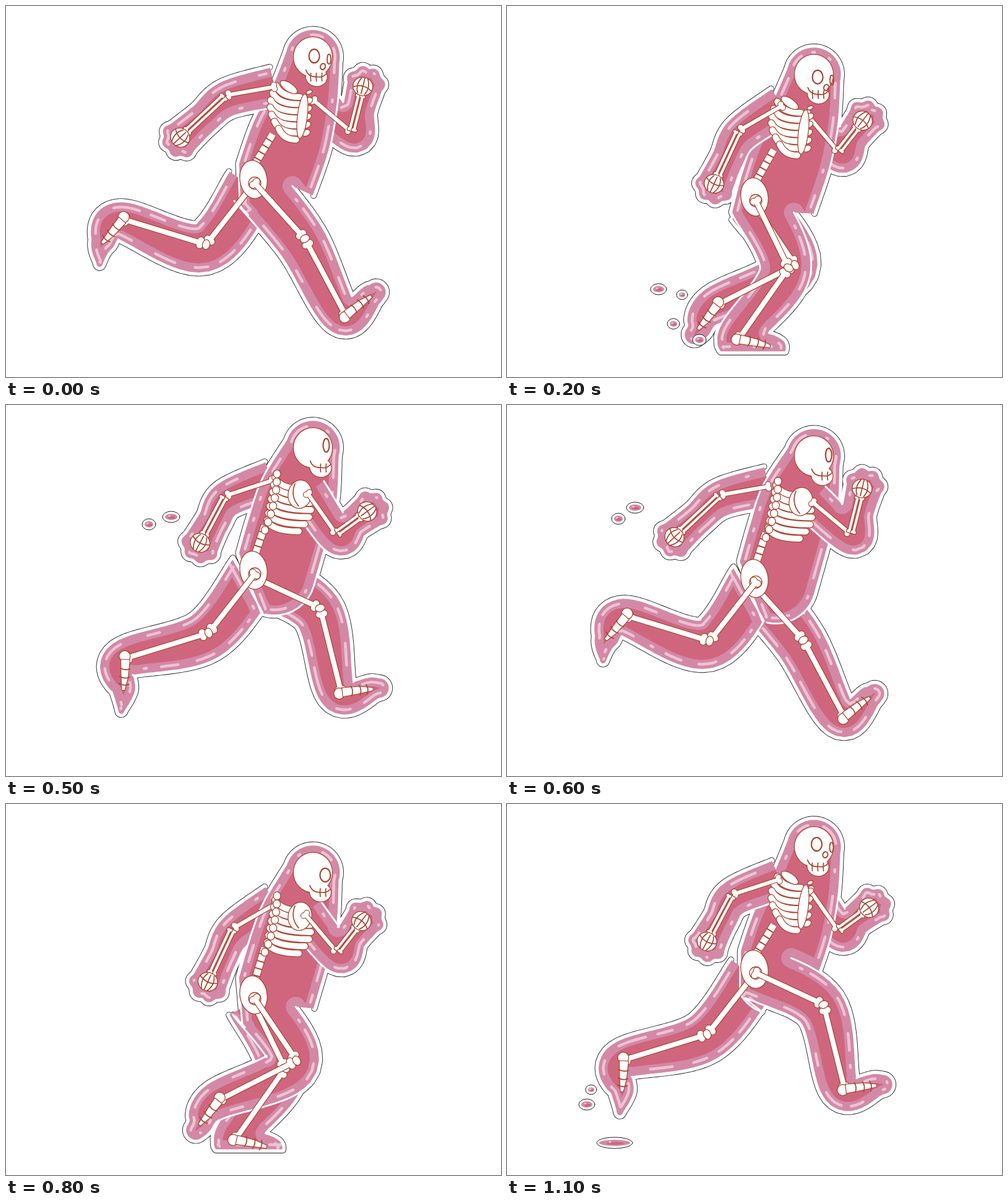
Write an HTML page with a canvas that moves like this. It is 800 px wide and 600 px high and loops after 1200 ms.

```html
<!DOCTYPE html>
<html lang="en">
<head>
<meta charset="utf-8">
<title>Running skeleton</title>
<style>
html, body { margin: 0; width: 100%; height: 100%; overflow: hidden; background: #fff; }
canvas { display: block; }
</style>
</head>
<body>
<canvas id="stage" width="800" height="600"></canvas>
<script>
const ctx = document.getElementById('stage').getContext('2d');
const WHITE = '#fff', INK = '#222', DEEP = '#cf667e', RIM = '#d389a5', SHINE = '#ecc3d4', EDGE = '#a9452f';
const STEP = 100, PHASES = 12, HALF = 6, FLOOR = 560;
const DEG = Math.PI / 180;

// Both sides share one cycle, half a turn apart.
// Leg: angles of thigh, shin and foot. Arm: angles of upper arm and forearm, forearm length.
const LEG = {
  0: [48, 62, -37], 2: [64, 125, 13], 4: [118, 132, 73], 5: [128, 163, 94],
  6: [128, 197, 131], 8: [56, 153, 128], 10: [17, 88, 35], 11: [25, 76, -6]
};
const ARM = {
  0: [170, 137, 100], 2: [150, 115, 95], 4: [87, 20, 97], 5: [55, -36, 62],
  6: [40, -76, 76], 8: [50, -52, 64], 10: [134, 57, 78], 11: [162, 118, 86]
};
// Flying drops: first and last phase, position, speed per phase, radius.
const DROPS = [
  [2, 4, 245, 458, -42, -15, 9], [2, 4, 283, 467, -52, -26, 5],
  [2, 4, 269, 514, -73, 11, 6], [2, 4, 311, 540, -82, -16, 7],
  [4, 6, 327, 196, -60, -15, 10], [4, 6, 282, 202, -51, -9, 7],
  [10, 11, 182, 464, -53, 22, 9], [10, 11, 204, 445, -68, 17, 5],
  [4, 4, 499, 499, 0, 0, 7], [11, 11, 174, 548, 0, 0, 25]
];

const lerp = (a, b, k) => a.map((v, i) => v + (b[i] - v) * k);
const dist = (a, b) => Math.hypot(a[0] - b[0], a[1] - b[1]);
const polar = (p, angle, r) => [p[0] + Math.cos(angle) * r, p[1] + Math.sin(angle) * r];
const heading = (a, b) => Math.atan2(b[1] - a[1], b[0] - a[0]);
const wave = p => Math.cos(p * 2 * Math.PI / PHASES);

function cycle(keys, phase) {
  const p = phase % PHASES;
  let lo = p, hi = p + 1;
  while (!keys[lo]) lo--;
  while (!keys[hi % PHASES]) hi++;
  return lerp(keys[lo], keys[hi % PHASES], (p - lo) / (hi - lo));
}

function legJoints(hip, phase) {
  const [thigh, shin, foot] = cycle(LEG, phase);
  const knee = polar(hip, thigh * DEG, 121), ankle = polar(knee, shin * DEG, 140);
  return [hip, knee, ankle, polar(ankle, foot * DEG, 52)];
}

function armJoints(shoulder, phase) {
  const [upper, fore, length] = cycle(ARM, phase);
  const elbow = polar(shoulder, upper * DEG, 82);
  return [shoulder, elbow, polar(elbow, fore * DEG, length)];
}

function spline(pts, i, t) {
  const at = n => pts[Math.max(0, Math.min(pts.length - 1, n))];
  const [a, b, c, d] = [at(i - 1), at(i), at(i + 1), at(i + 2)];
  return b.map((v, n) => v + 0.5 * t * (c[n] - a[n] +
    t * (2 * a[n] - 5 * v + 4 * c[n] - d[n] + t * (3 * (v - c[n]) + d[n] - a[n]))));
}

// Smooth centre line of [x, y, radius] nodes.
function chain(nodes) {
  const line = [];
  for (let i = 0; i < nodes.length - 1; i++)
    for (let s = 0; s < 14; s++) line.push(spline(nodes, i, s / 14));
  line.push(nodes[nodes.length - 1]);
  return line;
}

function arc(center, from, to, lobes = 0) {
  return Array.from({ length: 31 }, (_, i) => {
    const k = i / 30, bump = lobes ? 0.16 * Math.abs(Math.sin(k * lobes * Math.PI)) : 0;
    return polar(center, from + (to - from) * k, center[2] * (1 + bump));
  });
}

// Points of an outline that lie outside every circle of a chain.
const clear = (pts, line) => pts.filter(p => line.every(q => dist(p, q) > q[2] - 2.5));

function skin(line, lobes) {
  const fore = [], aft = [], last = line.length - 1, quarter = Math.PI / 2;
  let angle;
  line.forEach((q, i) => {
    angle = heading(line[Math.max(0, i - 1)], line[Math.min(last, i + 1)]);
    fore.push(polar(q, angle - quarter, q[2]));
    aft.unshift(polar(q, angle + quarter, q[2]));
  });
  const cap = arc(line[last], angle - quarter, angle + quarter, lobes);
  return { fore: clear(fore, line), cap: clear(cap, line), aft: clear(aft, line) };
}

// Evenly spaced points along a polyline.
function even(line, gap) {
  const out = [line[0]];
  let left = gap;
  for (let i = 1; i < line.length; i++) {
    const d = dist(line[i - 1], line[i]);
    let at = left;
    for (; at <= d; at += gap) out.push(lerp(line[i - 1], line[i], at / d));
    left = at - d;
  }
  return out;
}

const limb = ({ fore, cap, aft }) => even([...fore, ...cap, ...aft], 4);

// The flesh sags a little behind the bones; a lifted foot drips.
function legChain([hip, knee, ankle, toe], phase) {
  const drip = Math.max(0, wave(phase - 5.5) * 3 - 2);
  const tip = polar(toe, heading(ankle, toe), 10 * (1 - drip));
  return chain([
    [...hip, 44], [knee[0] - 5, knee[1] + 5, 41], [ankle[0] - 6, ankle[1] + 2, 31],
    [...toe, 20], [tip[0] - 4 * drip, tip[1] + 36 * drip, 17 - 12 * drip]
  ]);
}

function armChain([s, e, h]) {
  const elbow = [e[0] + 4, e[1] + 5], wrist = lerp(elbow, h, 0.5);
  return chain([[...s, 33], [...elbow, 30], [...wrist, 27], [h[0] + 3, h[1], 30]]);
}

const onFloor = pts => pts.map(([x, y]) => [x, Math.min(y, FLOOR)]);

function bodyOutline(legLine, torso, ahead) {
  const leg = skin(legLine), trunk = skin(torso);
  const up = heading(torso[0], torso[1]), down = up + Math.PI;
  const belly = ahead ? [] : arc(torso[0], up + Math.PI / 2, down);
  const seat = arc(torso[0], down, down + Math.PI / 2);
  const front = ahead ? leg.fore.slice(6) : clear(leg.fore, torso);
  return even([
    ...front, ...leg.cap, ...clear(leg.aft, torso),
    ...clear([...seat, ...trunk.fore], legLine), ...trunk.cap,
    ...clear([...trunk.aft, ...belly], legLine)
  ], 4);
}

function makePose(phase) {
  const bob = 21 * Math.cos((phase - 1.85) * Math.PI / 3), turn = wave(phase - 0.3);
  const twist = (1 - turn) / 2, far = phase + HALF;
  const hip = [402, 294 + bob], skull = [496, 90 + bob];
  const legs = [legJoints(hip, phase), legJoints([hip[0] - 4, hip[1] + 4], far)];
  const arms = [
    armJoints([464 - 29 * turn, 150 + 0.9 * bob - 13 * turn], phase),
    armJoints([460 + 36 * turn, 148 + 0.9 * bob + 10 * turn], far)
  ];
  const torso = chain([
    [434, hip[1] + 1, 66], [460 - 5 * twist, skull[1] + 130, 66],
    [481 - 7 * twist, skull[1] + 68, 56 + 8 * twist], [...skull, 45]
  ]);
  return {
    phase, bob, twist, hip, skull, legs, arms, back: turn < -0.2,
    flesh: [
      limb(skin(armChain(arms[1]), 4)),
      onFloor(limb(skin(legChain(legs[1], far % PHASES)))),
      onFloor(bodyOutline(legChain(legs[0], phase), torso, legs[0][1][0] > hip[0] + 20)),
      limb(skin(armChain(arms[0]), 4))
    ]
  };
}

function trace(pts) {
  ctx.beginPath();
  for (const p of pts) ctx.lineTo(p[0], p[1]);
}

function stroke(color, width) {
  ctx.strokeStyle = color;
  ctx.lineWidth = width;
  ctx.stroke();
}

function fill(color) {
  ctx.fillStyle = color;
  ctx.fill();
}

function oval(x, y, rx, ry, rot = 0) {
  ctx.beginPath();
  ctx.ellipse(x, y, rx, ry, rot, 0, 7);
}

function whiteOval(...spec) {
  oval(...spec);
  fill(WHITE);
  stroke(EDGE, 1.3);
}

function bow(x1, y1, cx, cy, x2, y2) {
  ctx.beginPath();
  ctx.moveTo(x1, y1);
  ctx.quadraticCurveTo(cx, cy, x2, y2);
}

function curve(...spec) {
  bow(...spec);
  stroke(EDGE, 1.7);
}

function local([x, y], angle, paint) {
  ctx.save();
  ctx.translate(x, y);
  ctx.rotate(angle);
  paint();
  ctx.restore();
}

function seeded(seed) {
  return () => (seed = seed * 16807 % 2147483647) / 2147483647;
}

function drawFlesh(pts, seed) {
  const random = seeded(seed * 977 + 31);
  ctx.save();
  trace(pts);
  ctx.clip();
  fill(DEEP);
  stroke(RIM, 32);
  for (let i = 5; i < pts.length - 4;) {
    const run = random() < 0.35 ? 1 : 5 + Math.floor(random() * 8), glint = [];
    for (let n = i; n <= i + run && n < pts.length - 2; n++)
      glint.push(polar(pts[n], heading(pts[n - 2], pts[n + 2]) + Math.PI / 2, 9));
    trace(glint);
    stroke(SHINE, 4.5);
    i += run + 4 + Math.floor(random() * 9);
  }
  ctx.restore();
  trace(pts);
  stroke(WHITE, 2.8);
}

function drawDrop([from, to, x0, y0, vx, vy, rx], phase) {
  if (phase < from || phase > to) return;
  const x = x0 + vx * (phase - from), y = y0 + vy * (phase - from), ry = Math.min(rx * 0.75, 5);
  oval(x, y, rx + 4, ry + 4);
  fill(WHITE);
  stroke(INK, 1);
  oval(x, y, rx, ry);
  fill(RIM);
  oval(x + 1, y + 1, rx * 0.6, ry * 0.45);
  fill(DEEP);
  oval(x - rx * 0.3, y - ry * 0.3, 2, 1.5);
  fill(SHINE);
}

function bone(a, b, width, knob, gapA, gapB) {
  const angle = heading(a, b), ends = [polar(a, angle, gapA), polar(b, angle, -gapB)];
  for (const [color, grow] of [[EDGE, 1.2], [WHITE, 0]]) {
    trace(ends);
    stroke(color, width + grow * 2);
    for (const end of ends)
      for (const side of [-1, 1]) {
        oval(...polar(end, angle + Math.PI / 2, side * knob * 0.8), knob + grow, knob + grow);
        fill(color);
      }
  }
}

function drawArm([s, e, h]) {
  const angle = heading(e, h), across = angle + Math.PI / 2;
  bone(s, e, 6, 4, 2, 5);
  for (const w of [-3.5, 3.5]) bone(polar(e, across, w), polar(h, across, w), 4, 2.3, 4, 16);
  local(h, angle, () => {
    whiteOval(0, 0, 15, 16);
    for (const y of [-8, 0, 8]) curve(-12, y * 0.7, 0, y * 1.6, 14, y * 0.6);
    curve(-4, -15, 5, 0, -4, 15);
  });
}

function drawLeg([hip, knee, ankle, toe]) {
  bone(hip, knee, 8, 5, 0, 9);
  bone(knee, ankle, 8, 5, 10, 4);
  whiteOval(...knee, 8, 6, heading(knee, ankle) + 1.5);
  const len = dist(ankle, toe);
  local(ankle, heading(ankle, toe), () => {
    whiteOval(-3, 2, 9, 9);
    trace([[2, -7], [len * 0.6, -6], [len, -2], [len, 3], [len * 0.5, 6], [2, 8]]);
    ctx.closePath();
    fill(WHITE);
    stroke(EDGE, 1.2);
    for (const k of [0.32, 0.58, 0.8]) curve(len * k, -8, len * k + 4, 0, len * k, 8);
  });
}

function drawRibs(center, back) {
  local(center, 0, () => {
    for (let i = 0; i < 7; i++) {
      const bulge = Math.sin(Math.PI * (i + 2) / 9.5), y = -42 + i * 11.5;
      const x1 = back ? -20 - 2.2 * i : -2 - 26 * bulge, x2 = back ? 38 * bulge : 20 - i;
      bow(x1, y, x1 + 8, y + 18, x2, y + 18);
      stroke(EDGE, 12);
      stroke(WHITE, 9.6);
    }
    if (back) {
      for (let i = 0; i < 8; i++) whiteOval(-17 - i * i * 0.4, -48 + i * 13, 6, 6.5);
      whiteOval(20, -15, 19, 23, 0.2);
      curve(12, -32, 4, -12, 18, 4);
    } else {
      for (let i = 0; i < 5; i++) whiteOval(34 - i, -18 + i * 13, 7, 5, -0.5);
      whiteOval(24, 7, 8, 36, 0.12);
      whiteOval(2, -40, 16, 7, 0.6);
      whiteOval(35, -32, 5, 3, -0.4);
    }
  });
}

function drawSkull([x, y], bob, twist) {
  const yaw = 2 + 22 * twist, jx = x + 5 + yaw * 0.35, jy = y + 32;
  for (const [color, grow] of [[EDGE, 1.2], [WHITE, 0]]) {
    oval(x, y, 31 + grow, 32 + grow);
    fill(color);
    oval(jx, jy, 17 + grow, 15 + grow, 0.15);
    fill(color);
  }
  const eye = x + yaw, ey = y + bob * 0.2;
  oval(eye, ey, yaw > 20 ? 5 : 8.5, 11);
  stroke(EDGE, 2.2);
  if (yaw < 18) {
    oval(Math.min(eye + 24, x + 29), ey + 5, 3, 8);
    stroke(EDGE, 1.8);
  }
  if (yaw < 12) {
    oval(eye + 14, ey + 17, 4, 5, 0.3);
    stroke(EDGE, 2);
  }
  curve(jx - 17, jy - 11, jx - 13, jy + 1, jx + 1, jy);
  curve(jx + 1, jy, jx + 10, jy + 2, jx + 16, jy - 5);
  for (let k = yaw < 12 ? -9 : 0; k < 10; k += 9) curve(jx + k, jy - 6, jx + k - 1, jy, jx + k, jy + 7);
}

function drawSpine(from, to) {
  trace([from, to]);
  ctx.lineCap = 'butt';
  stroke(EDGE, 13);
  ctx.setLineDash([10, 2]);
  stroke(WHITE, 11);
  ctx.setLineDash([]);
  ctx.lineCap = 'round';
}

function drawBones({ legs, arms, hip, skull, bob, twist, back }) {
  const ribs = [455, 178 + 0.9 * bob];
  drawLeg(legs[1]);
  drawArm(arms[1]);
  drawSpine([ribs[0] + (back ? -37 : -24), ribs[1] + 36], [hip[0] + 1, hip[1] - 32]);
  drawRibs(ribs, back);
  whiteOval(hip[0] - 2, hip[1] - 6, 22, 31, -0.15);
  drawSkull(skull, bob, twist);
  whiteOval(...hip, 10, 10);
  drawLeg(legs[0]);
  drawArm(arms[0]);
}

function draw(pose) {
  ctx.fillStyle = WHITE;
  ctx.fillRect(0, 0, 800, 600);
  ctx.lineCap = ctx.lineJoin = 'round';
  for (const [color, width] of [[INK, 10], [WHITE, 8.2]])
    for (const part of pose.flesh) {
      trace(part);
      stroke(color, width);
    }
  pose.flesh.forEach(drawFlesh);
  drawBones(pose);
  for (const drop of DROPS) drawDrop(drop, pose.phase);
}

const poses = Array.from({ length: PHASES }, (_, phase) => makePose(phase));
let shown = -1;
function tick() {
  const n = Math.floor(performance.now() / STEP) % PHASES;
  if (n !== shown) draw(poses[shown = n]);
  requestAnimationFrame(tick);
}
tick();
</script>
</body>
</html>
```
